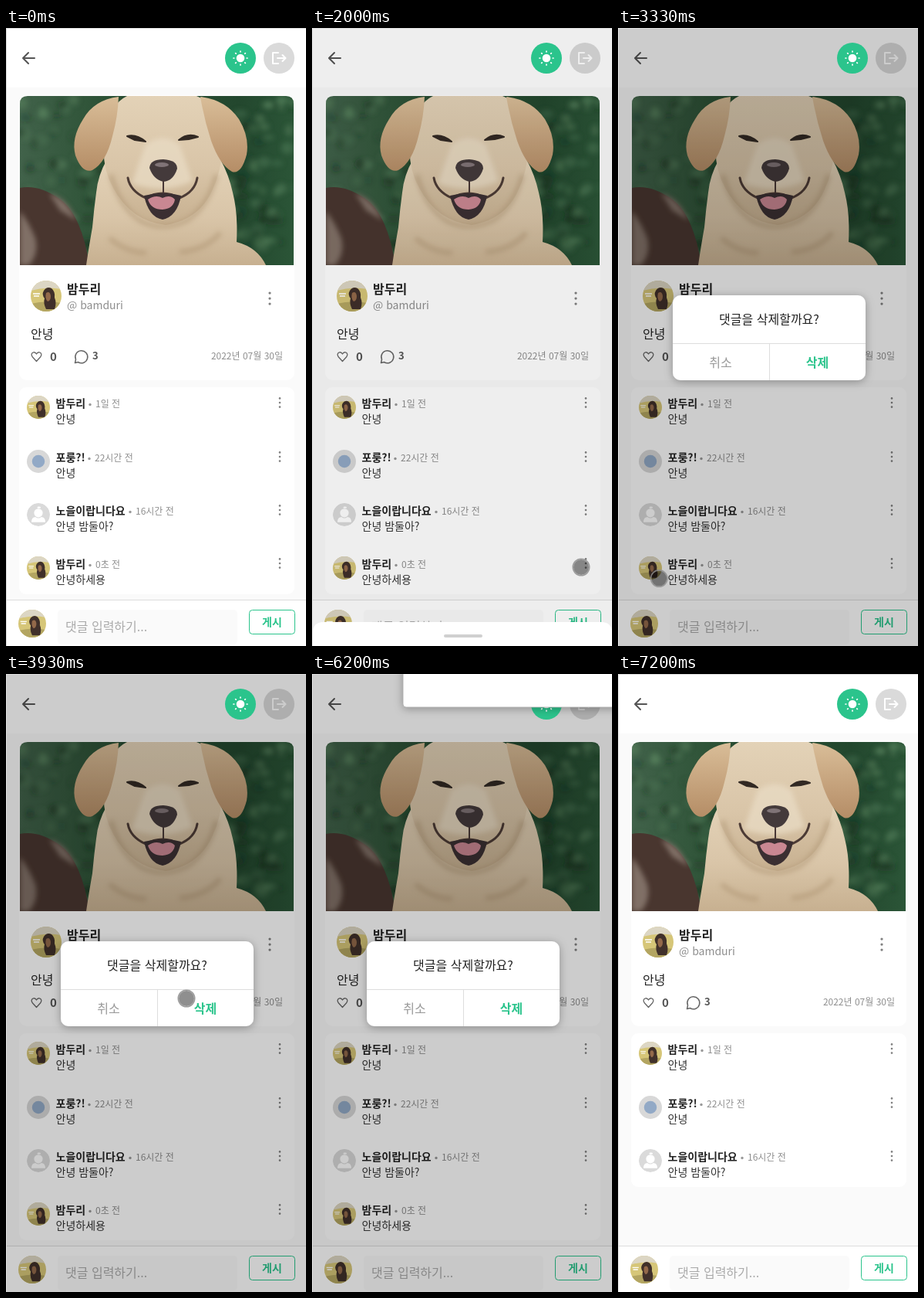
Write an HTML page that moves like this. It is 389x800 px and loops after 8000 ms.

```html
<!DOCTYPE html>
<html lang="ko">
<head>
<meta charset="utf-8">
<style>
  html, body { margin: 0; height: 100%; overflow: hidden; background: #fafafa; }
  svg { display: block; width: 100vw; height: 100vh; }
  text { font: 14px "Noto Sans CJK KR", "Noto Sans CJK", "Noto Sans KR", sans-serif; fill: #222; }
  .big { font-size: 16px; }
  .small { font-size: 12px; fill: #8e8e8e; }
  .bold { font-weight: 700; }
  .mid { text-anchor: middle; }
  .green { fill: #2bc48c; }
  .line { fill: none; stroke: #666; stroke-width: 1.5; stroke-linecap: round; stroke-linejoin: round; }
</style>
</head>
<body>
<svg viewBox="0 0 389 800">
  <defs>
    <clipPath id="photoClip"><path d="M18 307V98q0-10 10-10H363q10 0 10 10V307Z"/></clipPath>
    <clipPath id="round"><circle r="20"/></clipPath>
    <linearGradient id="forest">
      <stop offset="0" stop-color="#41624a"/><stop offset=".3" stop-color="#2d5236"/>
      <stop offset=".8" stop-color="#23472e"/><stop offset="1" stop-color="#2b5537"/>
    </linearGradient>
    <linearGradient id="fur" x2="0" y2="1">
      <stop offset="0" stop-color="#e3d2b7"/><stop offset=".55" stop-color="#d9c5a8"/><stop offset="1" stop-color="#c7b090"/>
    </linearGradient>
    <linearGradient id="ear" x2="0" y2="1">
      <stop offset="0" stop-color="#d9bd98"/><stop offset="1" stop-color="#b58d66"/>
    </linearGradient>
    <filter id="soft"><feGaussianBlur stdDeviation="3"/></filter>
    <filter id="shadow" x="-20%" y="-30%" width="140%" height="160%">
      <feDropShadow dx="0" dy="2" stdDeviation="6" flood-opacity=".3"/>
    </filter>
    <g id="pet" clip-path="url(#round)">
      <rect x="-20" y="-20" width="40" height="40" fill="#d6c678"/>
      <path d="M-20-20H20V-9Q0-13-20-7Z" fill="#dcd6c4"/>
      <path d="M-20 10Q0 5 20 9V20H-20Z" fill="#b3a561"/>
      <path d="M-3-7Q1-13 7-10Q12-6 11 2Q14 9 11 17H0Q-4 9-2 3Q-6-2-3-7Z" fill="#40302a"/>
      <path d="M0-4Q5-7 6 0Q6 6 2 7Q-2 3 0-4Z" fill="#93694a"/>
      <path d="M-17-3H-8M-16 0H-9" stroke="#fff" stroke-width="1.5"/>
    </g>
    <g id="blueFriend"><circle r="20" fill="#d8d8d8"/><circle r="11" fill="#92a9c6"/></g>
    <g id="nobody" clip-path="url(#round)">
      <circle r="20" fill="#dadada"/>
      <g fill="#fff"><circle cy="-3" r="7.5"/><ellipse cx="1" cy="-12.5" rx="3" ry="1.6"/>
      <path d="M-12 13Q-12 4-5 4Q0 8 5 4Q12 4 12 13Z"/></g>
    </g>
    <g id="dots" fill="#808080"><circle cy="-5.6" r="1.3"/><circle r="1.3"/><circle cy="5.6" r="1.3"/></g>
  </defs>

  <rect width="389" height="800" fill="#fafafa"/>
  <rect width="389" height="77" fill="#fff"/>
  <path class="line" d="M37 39H22M29 32L22 39L29 46" style="stroke:#555;stroke-width:2"/>
  <circle cx="354" cy="39" r="20" fill="#dadada"/>
  <path class="line" d="M353 32H346V46H353M352 39H362M358.500 35L362.500 39L358.500 43" style="stroke:#fff;stroke-width:2"/>

  <rect x="17" y="87" width="357" height="369" rx="10" fill="#fff"/>
  <g clip-path="url(#photoClip)">
    <rect x="18" y="88" width="355" height="219" fill="url(#forest)"/>
    <g id="leaves" filter="url(#soft)"></g>
    <path d="M340 88V307" stroke="#2f8a55" stroke-width="7" opacity=".6" filter="url(#soft)"/>
    <path d="M18 207Q42 202 69 221Q98 241 108 307H18Z" fill="#49362f"/>
    <path d="M18 237Q29 250 38 272Q43 292 30 307H18ZM56 214Q79 220 91 249L70 236Z" fill="#806f66" filter="url(#soft)"/>
    <path d="M104 307Q108 280 112 258Q114 235 117 213Q119 191 131 170H278Q289 190 294 213Q301 240 299 277Q326 284 337 307Z" fill="url(#fur)"/>
    <path d="M157 88H247Q273 98 278 135Q285 174 267 211Q250 248 207 255Q162 250 139 207Q121 175 129 132Q136 98 157 88Z" fill="url(#fur)"/>
    <path d="M146 89Q114 93 100 118Q84 143 90 165Q99 189 112 184Q130 174 138 140Q145 115 146 89Z" fill="url(#ear)"/>
    <path d="M252 89Q285 93 302 118Q316 141 312 164Q305 190 293 186Q277 177 266 146Q257 119 252 89Z" fill="url(#ear)"/>
    <path d="M181 151Q203 134 225 151L242 198Q205 216 163 201Z" fill="#e9dcc5" opacity=".75" filter="url(#soft)"/>
    <path d="M158 194Q161 211 181 220Q203 208 225 220Q245 212 248 194" fill="none" stroke="#4c3b35" stroke-width="3" stroke-linecap="round"/>
    <path d="M179 217Q191 214 203 214Q216 214 227 217Q222 244 203 248Q185 245 179 217Z" fill="#3b2f32"/>
    <path d="M184 222Q194 215 203 220Q213 215 219 222Q217 234 203 235Q188 235 184 222Z" fill="#c98792"/>
    <path d="M186 181Q187 170 204 170Q222 171 222 182Q217 198 204 199Q191 196 186 181Z" fill="#443a3b"/>
    <ellipse cx="202" cy="177" rx="9" ry="3" fill="#807477"/>
    <path d="M204 198V214" stroke="#493836" stroke-width="2"/>
    <path d="M157 140Q169 137 181 147L167 145ZM224 145Q236 135 249 141L237 144Z" fill="#322923" stroke="#322923" stroke-width="2" stroke-linejoin="round"/>
    <path d="M136 190Q147 232 175 250Q203 264 235 249Q262 231 273 190M134 272Q157 291 182 291M225 290Q258 288 278 265" fill="none" stroke="#a98f6d" stroke-width="6" opacity=".5" filter="url(#soft)"/>
  </g>

  <use href="#pet" transform="translate(52 347)"/>
  <text class="big bold" x="79" y="344">밤두리</text>
  <text x="79" y="364" style="fill:#8e8e8e">@ bamduri</text>
  <use href="#dots" transform="translate(342 350) scale(1.25)"/>
  <text class="big" x="32" y="402">안녕</text>
  <path class="line" d="M39.500 431.500L34.500 426Q31.500 422 35 420Q38 419 39.500 422Q41 419 44 420Q47.500 422 44.500 426Z" style="stroke-width:1.300"/>
  <text class="bold" x="57" y="431" style="font-size:15px;fill:#555">0</text>
  <path class="line" d="M89.500 433.500L90.500 429A8 8 0 1 1 93.500 432.500Z"/>
  <text class="bold" x="112" y="429" style="font-size:13px;fill:#555">3</text>
  <text class="small" x="359" y="429" text-anchor="end">2022년 07월 30일</text>

  <rect id="commentCard" x="17" y="465" width="357" height="268" rx="9" fill="#fff"/>
  <g id="comments"></g>

  <rect y="740" width="389" height="60" fill="#fff"/>
  <path d="M0 740.500H389" stroke="#ddd"/>
  <use href="#pet" transform="translate(34 771) scale(.9)"/>
  <rect x="67" y="753" width="233" height="45" rx="5" fill="#fafafa"/>
  <text class="big" x="77" y="781" style="fill:#aaa">댓글 입력하기...</text>
  <g id="focus">
    <path d="M77.500 764V787" stroke="#222"/>
    <path d="M67 793Q67 797.500 72 797.500H295Q300 797.500 300 793" fill="none" stroke="#2bc48c"/>
  </g>
  <rect x="315.500" y="753.500" width="59" height="31" rx="4" fill="#fff" stroke="#2bc48c"/>
  <text class="bold mid green" x="345" y="774">게시</text>

  <rect id="dim" x="1" y="1" width="388" height="799"/>
  <circle class="green" cx="304" cy="39" r="20"/>
  <circle cx="304" cy="39" r="5.300" fill="#fff"/>
  <g id="rays" stroke="#fff" stroke-width="1.700" stroke-linecap="round"></g>

  <g id="sheet">
    <path d="M1 820V723Q1 709 15 709H375Q389 709 389 723V820Z" fill="#fff"/>
    <rect x="171" y="725" width="50" height="4" rx="2" fill="#d0d0d0"/>
    <text class="big" x="27" y="775">삭제</text>
  </g>

  <g id="dialog">
    <rect x="71" y="346" width="250" height="110" rx="10" fill="#fff" filter="url(#shadow)"/>
    <path id="tap" d="M197 409H321V446Q321 456 311 456H197Z" fill="#ace0f4"/>
    <path d="M71 408.500H321M196.500 408V456" stroke="#ddd"/>
    <text class="big mid" x="196" y="383">댓글을 삭제할까요?</text>
    <text class="big mid" x="133" y="439" style="fill:#999">취소</text>
    <text class="big bold mid green" x="258.500" y="439">삭제</text>
  </g>

  <path d="M.5 800V.5H389" fill="none" stroke="#ddd"/>
  <path id="alert" d="M118-10H400V43H122Q118 43 118 39Z" fill="#fff" stroke="#999" stroke-width=".7" filter="url(#shadow)"/>
  <g id="touch">
    <circle r="10" fill-opacity=".44"/>
    <circle r="10.700" fill="none" stroke="#8c8c8c" stroke-opacity=".85" stroke-width="1.600"/>
  </g>
</svg>

<script>
const $ = id => document.getElementById(id);
const LOOP = 8000, FPS = 15;

const comments = [
  ['pet', '밤두리', 116, '1일 전', '안녕'],
  ['blueFriend', '포룽?!', 115, '22시간 전', '안녕'],
  ['nobody', '노을이랍니다요', 168, '16시간 전', '안녕 밤둘아?'],
  ['pet', '밤두리', 116, '0초 전', '안녕하세용']
];
$('comments').innerHTML = comments.map(([face, name, x, age, body], i) => `
  <g transform="translate(0 ${Math.ceil(i * 69.3)})">
    <use href="#${face}" transform="translate(42 491) scale(.75)"/>
    <text class="bold" x="64.500" y="491">${name}</text>
    <circle cx="${x - 7}" cy="487.500" r="1.700" fill="#999"/>
    <text class="small" x="${x}" y="491">${age}</text>
    <text x="64.500" y="511" style="fill:#333">${body}</text>
    <use href="#dots" transform="translate(355 485)"/>
  </g>`).join('');
const lastComment = $('comments').lastElementChild;

$('rays').innerHTML = Array.from({ length: 8 }, (_, i) =>
  `<path d="M304 30.800V30" transform="rotate(${i * 45} 304 39)"/>`).join('');

let seed = 7;
const random = () => (seed = seed * 16807 % 2147483647) / 2147483647;
$('leaves').innerHTML = Array.from({ length: 220 }, () =>
  `<ellipse cx="${18 + random() * 355}" cy="${88 + random() * 219}" rx="${3 + random() * 7}" ry="${3 + random() * 5}"
    fill="${random() < .5 ? '#152c1c' : '#5b8560'}" opacity="${.15 + random() * .4}"/>`).join('');

// time, x, y of the touch pointer
const path = [
  [1400, 348, 766], [1530, 348, 754], [1670, 348, 748], [1870, 349, 698], [2000, 349, 698],
  [2470, 62, 772], [2600, 30.5, 772], [3270, 31, 774], [3650, 172, 385],
  [3770, 210, 334], [3930, 234, 420], [6070, 234, 420], [6130, 241, 415]
];
const progress = (t, from, to) => Math.min(1, Math.max(0, (t - from) / (to - from)));
const within = (t, from, to) => t >= from && t < to;
const show = (el, on) => el.style.display = on ? '' : 'none';

function pointerAt(t) {
  const i = path.findIndex(p => p[0] > t);
  if (i < 1) return path[i ? path.length - 1 : 0].slice(1);
  const [a, b] = [path[i - 1], path[i]];
  const k = progress(t, a[0], b[0]);
  return [a[1] + (b[1] - a[1]) * k, a[2] + (b[2] - a[2]) * k];
}

function draw(now) {
  const tick = Math.floor((now % LOOP + 5) * FPS / 1000);
  const t = Math.round(tick * 100 / FPS) * 10;
  const rise = 1 - (1 - progress(t, 1930, 2470)) ** 3;

  show($('focus'), within(t, 1670, 2000));
  show($('sheet'), within(t, 2000, 3070));
  $('sheet').setAttribute('transform', `translate(0 ${91 * (1 - rise)})`);
  $('dim').setAttribute('opacity', t < 7070 ? .2 * rise : 0);

  show($('dialog'), within(t, 3070, 7070));
  $('tap').setAttribute('opacity', t < 5400 ? 0 : 1 - progress(t, 5400, 5600));
  const alertAlpha = progress(t, 5530, 5800) * (1 - progress(t, 6870, 7070));
  show($('alert'), alertAlpha > 0);
  $('alert').setAttribute('opacity', alertAlpha);

  show($('touch'), within(t, 1400, 6200));
  $('touch').setAttribute('transform', `translate(${pointerAt(t)})`);

  show(lastComment, t < 7200);
  $('commentCard').setAttribute('height', t < 7200 ? 268 : 199);
  requestAnimationFrame(() => draw(performance.now()));
}
draw(0);
</script>
</body>
</html>
```
